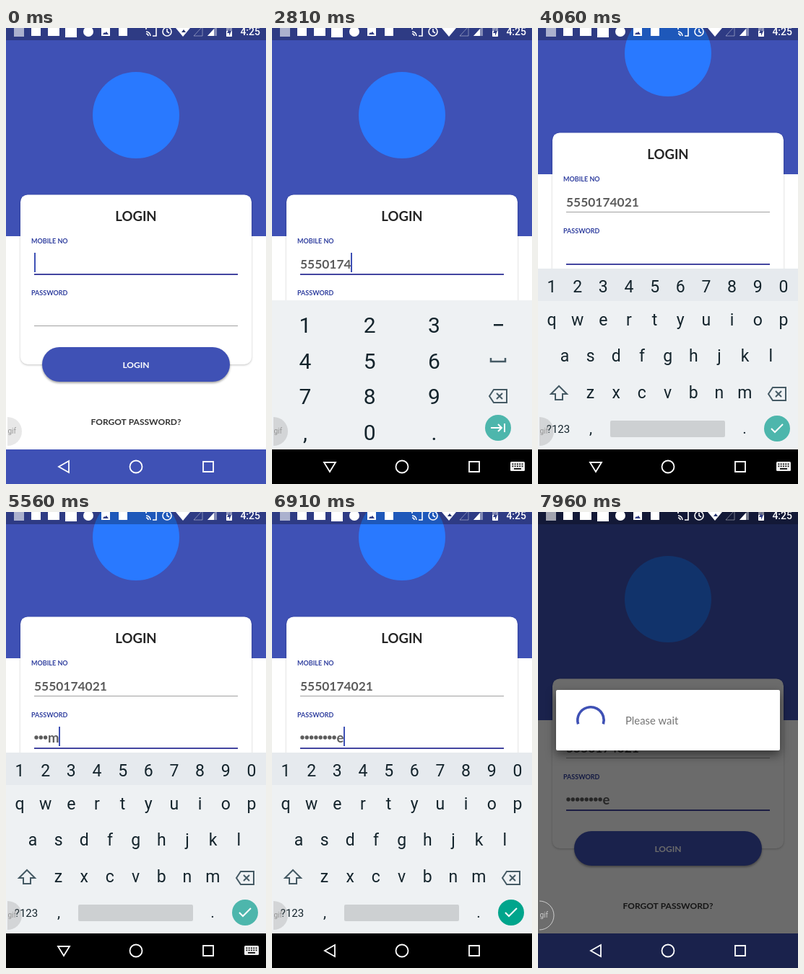
An HTML page with a canvas that plays this animation: 360x633 px, repeating every 8000 ms.

```html
<!DOCTYPE html>
<html lang="en">
<head>
<meta charset="utf-8">
<title>Login screen</title>
<style>
  html, body { margin: 0; width: 100%; height: 100%; overflow: hidden; background: #fff; }
  canvas { display: block; width: 360px; height: 633px; }
</style>
</head>
<body>
<canvas id="stage"></canvas>
<script>
const LOOP = 8000, W = 360, H = 633, NAV_TOP = 585;
const INDIGO = '#3f51b5', TEAL = '#4db6ac', INK = '#14242c', ICON = '#455a64';
const LATO = 'Lato, sans-serif', ROBOTO = 'Roboto, sans-serif';

const PHONE = '5550174021';
const PHONE_TIMES = [1660, 1850, 2150, 2340, 2530, 2630, 2720, 2910, 3000, 3110];
const PASSWORD = 'saymanyme';
const PASSWORD_TIMES = [4440, 4720, 5110, 5380, 5660, 5850, 6040, 6240, 6430];
const PRESS = 90;
const PAD = ['123−', '456', '789', ',0.'];

const canvas = document.getElementById('stage');
const ctx = canvas.getContext('2d');
const ratio = window.devicePixelRatio || 1;
canvas.width = W * ratio;
canvas.height = H * ratio;

const progress = (t, from, to) => Math.min(1, Math.max(0, (t - from) / (to - from)));
const smooth = p => p * p * (3 - 2 * p);
const within = (t, from, to) => t >= from && t < to;
const typedCount = (times, t) => times.filter(time => time <= t).length;
const pressedKey = (keys, times, t) => keys[times.findIndex(time => within(t, time, time + PRESS))];

function text(str, x, y, size, color, { font = LATO, weight = 700, align = 'left' } = {}) {
  ctx.font = `${weight} ${size}px ${font}`;
  ctx.textAlign = align;
  ctx.fillStyle = color;
  ctx.fillText(str, x, y);
}
function keyText(str, x, y, size) {
  text(str, x, y, size, INK, { font: ROBOTO, weight: 400, align: 'center' });
}
function rect(x, y, w, h, color, radius = 0) {
  ctx.fillStyle = color;
  ctx.beginPath();
  ctx.roundRect(x, y, w, h, radius);
  ctx.fill();
}
function circle(x, y, r, color) {
  ctx.fillStyle = color;
  ctx.beginPath();
  ctx.arc(x, y, r, 0, 7);
  ctx.fill();
}
function shape(d, x, y, color, width = 0) {
  const path = new Path2D(d);
  ctx.save();
  ctx.translate(x, y);
  ctx.fillStyle = ctx.strokeStyle = color;
  ctx.lineWidth = width;
  if (width) ctx.stroke(path); else ctx.fill(path);
  ctx.restore();
}
function shadowed(blur, offset, alpha, draw) {
  ctx.save();
  ctx.shadowColor = `rgba(0,0,0,${alpha})`;
  ctx.shadowBlur = blur * ratio;
  ctx.shadowOffsetY = offset * ratio;
  draw();
  ctx.restore();
}

function fieldLine(y, focused) {
  if (focused) rect(39, y - 1, 282, 2, '#4345a0');
  else rect(39, y - 1, 282, 1, '#a0a0a0');
}

function drawPage(t) {
  const pan = 86 * (smooth(progress(t, 3680, 4000)) - smooth(progress(t, 6990, 7230)));
  const onPassword = t >= 3640;
  rect(0, 0, W, H, '#fff');
  ctx.save();
  ctx.translate(0, -pan);
  rect(0, 0, W, 289, INDIGO);
  circle(180, 121, 60, '#2979ff');
  shadowed(3, 1, .24, () => rect(20, 231.4, 320, 235.6, '#fff', 10));
  text('LOGIN', 180, 268, 18.5, '#252525', { align: 'center' });
  text('MOBILE NO', 35, 299, 9, '#303f9f');
  text('PASSWORD', 35, 371, 9, '#303f9f');
  fieldLine(342, !onPassword);
  fieldLine(414, onPassword);

  const digits = PHONE.slice(0, typedCount(PHONE_TIMES, t));
  text(digits, 39, 333.5, 17.4, '#5c5c5c');
  if (within(t, 0, 310) || within(t, 790, 1260) || within(t, 1660, 3590))
    rect(39 + Math.floor(ctx.measureText(digits).width), 312, 2, 27, INDIGO);

  // Only the latest password letter stays readable.
  const count = typedCount(PASSWORD_TIMES, t);
  if (count) {
    const hidden = count - 1, letter = PASSWORD[hidden], x = 39 + hidden * 6.3;
    for (let i = 0; i < hidden; i++) circle(42 + i * 6.3, 399, 2.7, '#5c5c5c');
    text(letter, x, 405.5, 18.5, '#5c5c5c');
    if (t < 7100) rect(Math.round(x + ctx.measureText(letter).width), 384, 2, 27, INDIGO);
  }

  shadowed(3, 2, .35, () => rect(50, 443, 260, 48, INDIGO, 24));
  text('LOGIN', 180, 472, 12, '#fff', { align: 'center' });
  text('FORGOT PASSWORD?', 180, 551, 12, '#333', { align: 'center' });
  ctx.restore();
}

function backspace(x, y) {
  shape('M-12 0 L-6 -9 H12 V9 H-6 Z', x, y, ICON, 2);
  shape('M-2 -4 L6 4 M6 -4 L-2 4', x, y, ICON, 2);
}

function drawPad(t) {
  rect(0, 378, W, 255, '#eef1f3');
  const pressed = pressedKey(PHONE, PHONE_TIMES, t);
  PAD.forEach((row, r) => [...row].forEach((key, c) => {
    const y = 412 + r * 49.6;
    if (key === pressed) rect(2 + c * 89, y - 25, 89, 48, '#d3d8db');
    if (key === '−') rect(307, 411, 13, 2.5, INK);
    else keyText(key, 46 + c * 89.2, y + 11, 30);
  }));
  shape('M-10 -4 V1 H10 V-4', 313, 462, ICON, 2.5);
  backspace(313, 511);
  circle(313, 555, 18, t >= 3590 ? '#00a58c' : TEAL);
  shape('M-10 0 H5 M0 -5 L5 0 L0 5 M9 -6 V6', 313, 555, '#fff', 2);
}

const letterKeys = {};
[['1234567890', 19, 359], ['qwertyuiop', 19, 406], ['asdfghjkl', 37, 456], ['zxcvbnm', 72.5, 507]]
  .forEach(([row, x, y]) => [...row].forEach((key, i) => letterKeys[key] = { x: x + i * 35.65, y }));

function drawLetters(t) {
  rect(0, 334, W, 299, '#eef1f3');
  rect(0, 334, W, 45, '#e6eaee');
  for (const [key, { x, y }] of Object.entries(letterKeys)) keyText(key, x, y + (y < 380 ? 8 : 7), 23);
  shape('M0 -10 L11 1 H5 V9 H-5 V1 H-11 Z', 29, 507, ICON, 2);
  backspace(331, 508);
  keyText('?123', 28, 562, 15);
  keyText(',', 73, 563, 21);
  rect(100, 545, 159, 23, '#cdd0d2', 2);
  keyText('.', 286, 563, 21);
  circle(331, 556, 18, t >= 6810 ? '#00a58c' : TEAL);
  shape('M-8 0 L-3 5 L8 -6', 331, 556, '#fff', 2);

  const pressed = pressedKey(PASSWORD, PASSWORD_TIMES, t);
  if (pressed) {
    const { x, y } = letterKeys[pressed];
    shadowed(4, 1, .3, () => rect(x - 23, y - 60, 46, 87, '#fafafa', 4));
    keyText(pressed, x, y - 28, 30);
  }
}

function drawKeyboard(t) {
  const shown = smooth(progress(t, 1000, 1240)) - smooth(progress(t, 6990, 7170));
  if (shown <= 0) return;
  ctx.save();
  ctx.globalAlpha = shown;
  ctx.translate(0, 25 * (1 - shown));
  if (t < 3680) drawPad(t); else drawLetters(t);
  ctx.restore();
}

function drawDialog(t) {
  const shown = smooth(progress(t, 7180, 7480));
  if (!shown) return;
  rect(0, 0, W, H, `rgba(0,0,0,${.58 * shown})`);
  ctx.save();
  ctx.globalAlpha = shown;
  shadowed(14, 6, .5, () => rect(25, 247, 310, 84, '#fff', 2));
  text('Please wait', 121, 295, 14.8, '#757575', { weight: 400 });

  // The head grows for half a cycle, then the tail catches up while the ring turns.
  const age = (t - 7100) / 1000, cycle = age / 1.333 % 1;
  const head = 270 * smooth(progress(cycle, 0, .5));
  const tail = 270 * smooth(progress(cycle, .5, 1));
  const turn = 229 * age - 90, rad = Math.PI / 180;
  ctx.strokeStyle = INDIGO;
  ctx.lineWidth = 3.6;
  ctx.beginPath();
  ctx.arc(73, 289, 18.2, (turn + tail) * rad, (turn + head) * rad);
  ctx.stroke();
  ctx.restore();
}

function drawStatusIcons(t) {
  const white = '#fff';
  rect(11, -1, 14, 13, 'rgba(255,255,255,.6)');
  rect(35, 0, 13, 11, white);
  rect(58, 0, 16, 11, white);
  rect(82, -2, 16, 15, white);
  circle(114, 5, 7, white);
  shape('M-6 -7 H6 V6 H-6 Z', 138, 5, white);
  shape('M-4 4 H4 L1 0 L-1 2 L-2 1 Z', 138, 5, '#303d85');
  rect(156, -1, 12, 12, white);
  shape('M-7 -3 V-7 H7 V6 H2 M-7 0 A6 6 0 0 1 -1 6 M-7 3 A3 3 0 0 1 -4 6', 201, 5, white, 1.6);
  shape('M6 0 A6 6 0 1 1 -6 0 A6 6 0 1 1 6 0 M0 -4 V0 L3 2', 223, 5, white, 1.6);
  shape('M-10 -5 Q0 -12 10 -5 L0 7 Z', 245, 5, white);
  if (!within(t, 2340, 6340)) shape('M-3 1 L0 -3 L3 1 Z', 246, 5, '#26346f');
  shape('M-6 6 H6 V-7 Z', 266, 5, 'rgba(255,255,255,.4)', 1);
  shape('M-7 6 H6 V-8 Z', 286, 5, 'rgba(255,255,255,.4)');
  shape('M-7 6 H2 V-4 Z', 286, 5, white);
  rect(305, -2, 8, 14, 'rgba(255,255,255,.45)', 1);
  rect(305, 4, 8, 8, white, 1);
  shape('M1 -5 L-3 2 H0 V6 L3 -1 H0 Z', 309, 5, '#303d85');
  text('4:25', 352, 10, 14, white, { font: ROBOTO, weight: 500, align: 'right' });
}

function drawNavIcons(t) {
  const typing = within(t, 1080, 6910);
  shape(typing ? 'M-8 -6 H8 L0 7 Z' : 'M7 -8 V8 L-7 0 Z', 80, 609, '#fff', 1.8);
  shape('M8.5 0 A8.5 8.5 0 1 1 -8.5 0 A8.5 8.5 0 1 1 8.5 0', 180, 609, '#fff', 1.8);
  shape('M-7 -7 H7 V7 H-7 Z', 280, 609, '#fff', 1.8);
  if (typing) {
    rect(330, 602, 20, 13, '#eee', 1.5);
    for (let i = 0; i < 10; i++) rect(332.5 + i % 5 * 3.3, 604.5 + (i > 4) * 3, 1.7, 1.7, '#000');
    rect(335, 611, 10, 1.7, '#000');
  }
}

function drawBubble(t) {
  const dim = t >= 7300;
  ctx.save();
  ctx.beginPath();
  ctx.rect(2, 535, 30, 50);
  ctx.clip();
  circle(2, 560, 20, dim ? 'rgba(128,128,128,.08)' : `rgba(110,110,110,${t < 100 ? .16 : .21})`);
  if (dim) shape('M0 -20 A20 20 0 0 1 0 20', 2, 560, 'rgba(255,255,255,.65)', 1);
  text('gif', 2.5, 563, 10, dim ? '#ccc' : '#969696', { font: ROBOTO, weight: 400 });
  ctx.restore();
}

function draw(t) {
  ctx.setTransform(ratio, 0, 0, ratio, 0, 0);
  drawPage(t);
  drawKeyboard(t);
  rect(0, 0, W, 17, 'rgba(0,0,0,.27)');
  rect(0, NAV_TOP, W, H - NAV_TOP, within(t, 1080, 7100) ? '#000' : INDIGO);
  drawDialog(t);
  drawStatusIcons(t);
  drawNavIcons(t);
  drawBubble(t);
}

function frame() {
  draw(performance.now() % LOOP);
  requestAnimationFrame(frame);
}
frame();
</script>
</body>
</html>
```
